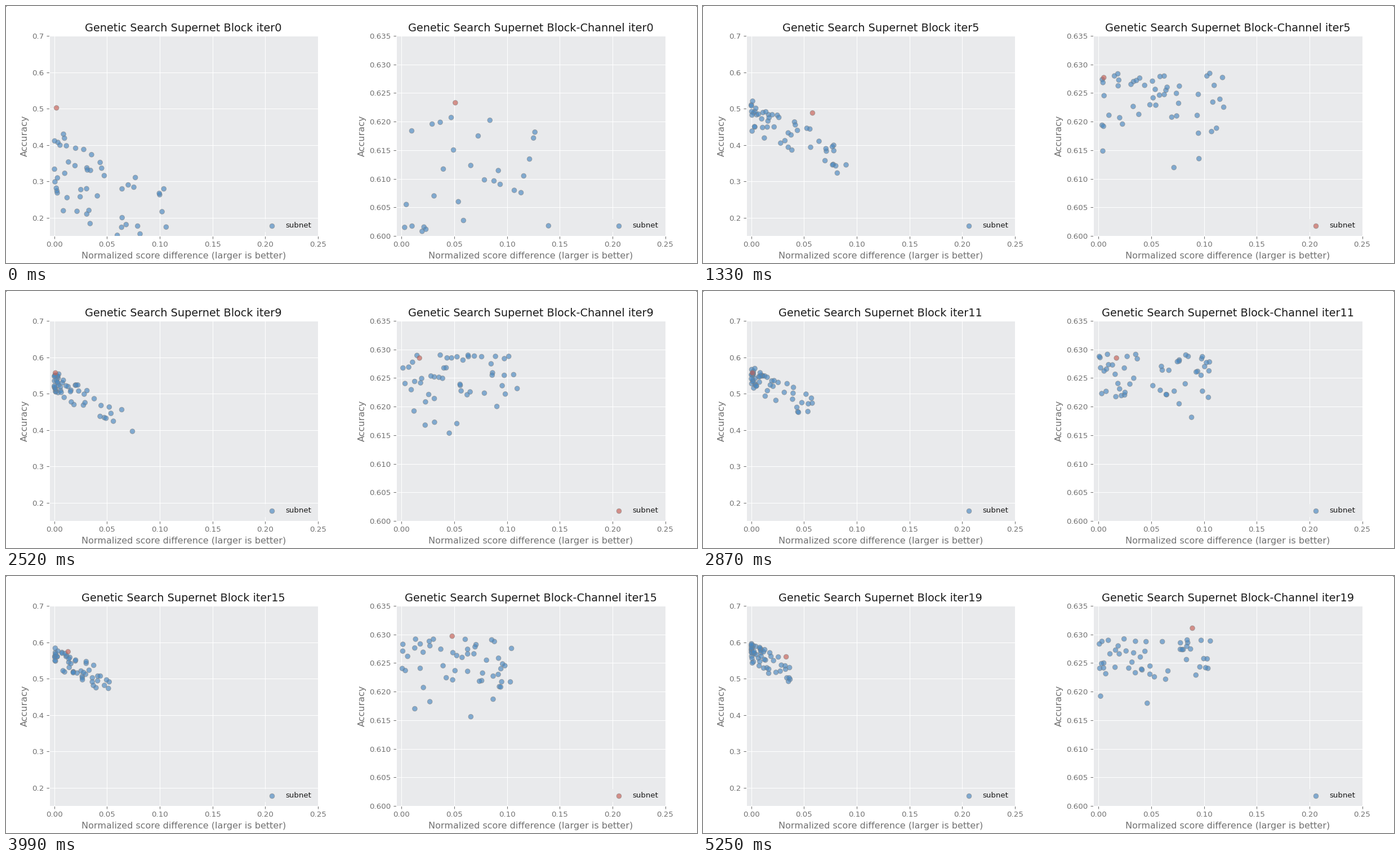
These frames come from a looping animation (1227 px wide and 456 px high, 5.32 s). A matplotlib script:

```python
import matplotlib.pyplot as plt
import numpy as np
from matplotlib.animation import FuncAnimation
from matplotlib.colors import to_rgba
from matplotlib.patches import Polygon

WIDTH, HEIGHT, DPI = 1227, 456, 96
FRAMES, INTERVAL = 76, 70
FIRST_HOLD, STEP, LAST_ITER = 30, 250, 19  # ms, ms, iterations
POPULATION, ELITE = 50, 8

BLUE, RED = to_rgba("#4a88c0", 0.66), to_rgba("#c65f55", 0.66)
EDGE = to_rgba("#808080", 0.6)
GREY, DARK, PANEL = "#717171", "#1a1a1a", "#e9eaec"

# Best subnet (score, accuracy) from the given iteration on.
BLOCK_BEST = {0: (.002, .502), 2: (.018, .512), 5: (.058, .488), 9: (.001, .557),
              13: (.057, .536), 15: (.013, .574), 19: (.033, .560)}
CHANNEL_BEST = {0: (.051, .6233), 2: (.002, .6258), 5: (.005, .6277),
                9: (.017, .6285), 13: (.048, .6297), 19: (.089, .6311)}


def block_cloud(i, rng):
    """Cloud that climbs, tilts down to the right and contracts."""
    reach = 0.11 - 0.07 * i / LAST_ITER
    level = 0.575 - 0.235 * np.exp(-i / 5.5)
    spread = 0.03 + 0.08 * np.exp(-i / 3)
    score = reach * rng.random(POPULATION) ** 1.9
    return score, level - 1.4 * score + spread * rng.uniform(-1, 1, POPULATION)


def channel_cloud(i, rng):
    """Wide flat cloud that rises into view, with a few stragglers below."""
    youth = np.exp(-i / 2.2)
    reach = 0.105 + 0.04 * np.exp(-i / 5)
    level = 0.6255 - 0.0235 * youth
    spread = 0.0038 + 0.016 * youth
    score = reach * rng.random(POPULATION) ** 1.2
    lag = np.where(rng.random(POPULATION) < 0.1, rng.uniform(0.003, 0.01, POPULATION), 0)
    return score, level - lag + spread * rng.uniform(-1, 1, POPULATION)


def evolve(cloud, seed):
    """Points of every iteration; the most accurate ones live on for one more."""
    generations, elite = [], np.empty((0, 2))
    for i in range(LAST_ITER + 1):
        born = np.column_stack(cloud(i, np.random.default_rng([seed, i])))
        generations.append(np.vstack([elite, born[len(elite):]]))
        elite = born[np.argsort(born[:, 1])[-ELITE:]]
    return generations


class Panel:
    def __init__(self, fig, left, name, generations, best, yticks, bottom, digits, red_keys=()):
        self.name, self.generations, self.best = name, generations, best
        self.red_keys = red_keys
        ax = fig.add_axes([left / WIDTH, 48 / HEIGHT, 477.5 / WIDTH, 355 / HEIGHT])
        ax.set_facecolor(PANEL)
        ax.set_axisbelow(True)
        ax.grid(color="white", linewidth=0.8)
        ax.spines[:].set_color("white")
        ax.tick_params(color=GREY, labelcolor=GREY, labelsize=10)
        xticks = np.arange(6) * 0.05
        ax.set_xticks(xticks, [f"{x:.2f}" for x in xticks])
        ax.set_yticks(yticks, [f"{y:.{digits}f}" for y in yticks])
        ax.set_xlim(-0.005, 0.25)
        ax.set_ylim(bottom, yticks[-1])
        ax.set_xlabel("Normalized score difference (larger is better)", color=GREY, fontsize=12)
        ax.set_ylabel("Accuracy", color=GREY, fontsize=12)
        self.title = ax.set_title("", color=DARK, fontsize=14.4)
        self.dots = ax.scatter([0], [0], s=42, facecolors=[BLUE], edgecolors=[EDGE],
                               linewidths=0.7, label="subnet", zorder=2)
        legend = ax.legend(loc="lower right", fontsize=10, labelcolor=DARK, facecolor=PANEL,
                           edgecolor="none", framealpha=0.8, scatterpoints=1)
        self.key = legend.legend_handles[0]

    def show(self, i):
        points = self.generations[i]
        best = self.best[max(k for k in self.best if k <= i)]
        self.dots.set_offsets(np.vstack([points, best]))
        self.dots.set_facecolors([BLUE] * len(points) + [RED])
        self.key.set_facecolor(RED if i in self.red_keys else BLUE)
        self.title.set_text(f"Genetic Search Supernet {self.name} iter{i}")


plt.rcParams["font.family"] = "DejaVu Sans"
fig = plt.figure(figsize=(WIDTH / DPI, HEIGHT / DPI), dpi=DPI, facecolor="white")
panels = [
    Panel(fig, 76.5, "Block", evolve(block_cloud, 1), BLOCK_BEST,
          np.arange(2, 8) / 10, 0.15, 1),
    Panel(fig, 693, "Block-Channel", evolve(channel_cloud, 2), CHANNEL_BEST,
          0.6 + np.arange(8) * 0.005, 0.6, 3, red_keys=(5, 9, 15)),
]
# Clipped window corners along the top edge.
for x, inward in ((0, 2 / WIDTH), (1, -2 / WIDTH)):
    fig.add_artist(Polygon([(x, 1), (x + inward, 1), (x, 1 - 2 / HEIGHT)],
                           facecolor="#777777", linewidth=0))


def update(frame):
    iteration = int(np.clip((frame * INTERVAL - FIRST_HOLD) // STEP, 0, LAST_ITER))
    for panel in panels:
        panel.show(iteration)


animation = FuncAnimation(fig, update, frames=FRAMES, interval=INTERVAL,
                          repeat=True, repeat_delay=0)
plt.show()
```
